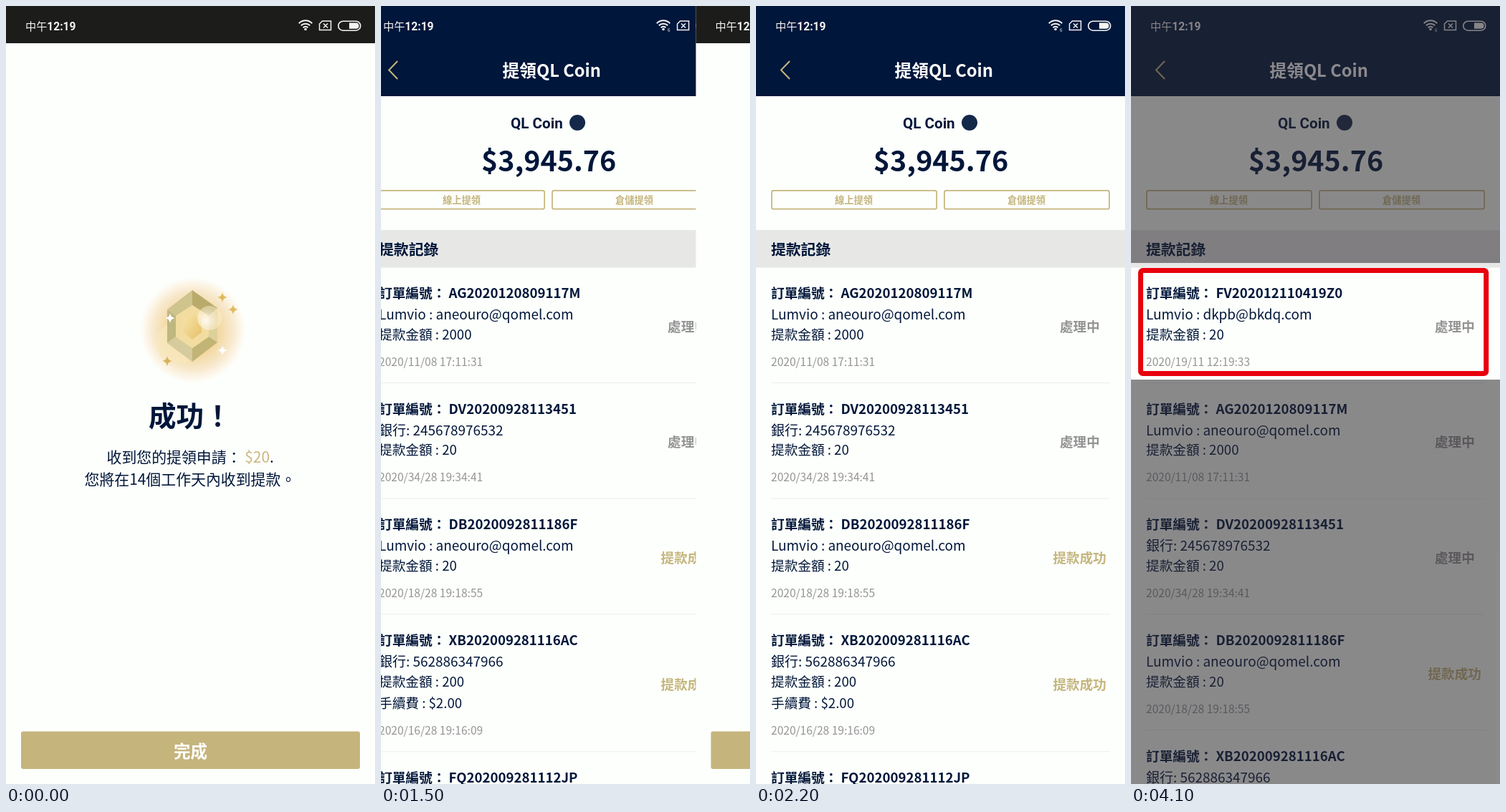
Write an HTML page that moves like this. It is 515 px wide and 1087 px high and loops after 4.8 s.

```html
<!DOCTYPE html>
<html lang="zh-TW">
<head>
<meta charset="utf-8">
<title>提領記錄</title>
<style>
  html, body { margin: 0; width: 100%; height: 100%; overflow: hidden; background: #00112b; }
  svg { display: block; width: 100%; height: 100%; }
  text { font-family: "Noto Sans CJK TC", "Noto Sans CJK SC", "Noto Sans CJK JP", "Noto Sans CJK", sans-serif; white-space: pre; }
  .roboto { font-family: Roboto, sans-serif; }
</style>
</head>
<body>
<svg id="stage" viewBox="0 0 515 1087" preserveAspectRatio="none">
  <defs>
    <radialGradient id="glow">
      <stop offset="0" stop-color="#f0d08c"/>
      <stop offset=".5" stop-color="#f3d9a4"/>
      <stop offset=".75" stop-color="#f8e9cd"/>
      <stop offset=".92" stop-color="#fdf8ee"/>
      <stop offset="1" stop-color="#fdfffc"/>
    </radialGradient>
    <radialGradient id="orb" cx=".35" cy=".6">
      <stop offset="0" stop-color="#fff" stop-opacity=".85"/>
      <stop offset="1" stop-color="#fbeecb" stop-opacity=".5"/>
    </radialGradient>
    <linearGradient id="core" x2="1" y2="1">
      <stop offset="0" stop-color="#f7e6b0"/>
      <stop offset="1" stop-color="#e6c065"/>
    </linearGradient>
  </defs>
</svg>
<script>
const NAVY = '#00163a', GOLD = '#c5b57d', GRAY = '#949494', PAPER = '#fdfffc';
const W = 515, H = 1087, LOOP = 4800;

const text = (x, y, size, str, fill = NAVY, weight = 400, extra = '') =>
  `<text x="${x}" y="${y}" font-size="${size}" font-weight="${weight}" fill="${fill}" ${extra}>${str}</text>`;
const rect = (x, y, w, h, fill, extra = '') =>
  `<rect x="${x}" y="${y}" width="${w}" height="${h}" fill="${fill}" ${extra}/>`;
const poly = (points, fill) => `<polygon points="${points}" fill="${fill}"/>`;
const circle = (x, y, r, fill, extra = '') => `<circle cx="${x}" cy="${y}" r="${r}" fill="${fill}" ${extra}/>`;
const star = (x, y, r, fill) =>
  `<path transform="translate(${x} ${y}) scale(${r})" fill="${fill}" d="M0-1Q.12-.12 1 0Q.12.12 0 1Q-.12.12-1 0Q-.12-.12 0-1"/>`;
const MIDDLE = 'text-anchor="middle"';

function statusBar(color, height, badge) {
  const arc = r => `M${418 - r * .72} ${33.5 - r * .72}A${r} ${r} 0 0 1 ${418 + r * .72} ${33.5 - r * .72}`;
  return rect(0, 0, W, height, color) +
    text(27, 33.5, 15.2, '中午', '#f4f4f4') +
    text(57.3, 33.5, 15.6, '12:19', '#f4f4f4', 700, 'class="roboto"') +
    `<g fill="none" stroke="#f4f4f4" stroke-width="2">
      <path d="${arc(12.8)}${arc(8.6)}${arc(4.6)}"/>
      <path stroke-width="1.5" d="M441.5 21H453.5V33.5H437.5V25ZM443 24.5L449 30.5M449 24.5L443 30.5"/>
      <rect x="463.8" y="21.2" width="31" height="13" rx="6.5" stroke-width="1.6"/>
    </g>` +
    circle(418, 32.5, 1.8, '#f4f4f4') +
    `<path fill="#f4f4f4" d="M479 23.6H488.5A4.1 4.1 0 0 1 488.5 31.8H479Z"/>` +
    (badge ? text(424, 36, 6.5, '6', '#f4f4f4') : '');
}

function gem() {
  return circle(261, 453, 74, 'url(#glow)') +
    circle(240, 471, 30, '#f8e9bd', 'opacity=".75"') +
    poly('260,397 225,424 237,433 260,418', '#cfc48e') +
    poly('260,397 295,422 283,433 260,418', '#b9ab6c') +
    poly('225,424 237,433 237,462 225,471', '#c0b67f') +
    poly('295,422 283,433 283,462 295,470', '#ded09a') +
    poly('225,471 237,462 260,478 260,497', '#d5cb9c') +
    poly('295,470 283,462 260,478 260,497', '#c2b475') +
    poly('260,418 283,433 283,462 260,478 237,462 237,433', '#f2dca0') +
    poly('260,429 273,437 273,456 260,466 247,456 247,437', 'url(#core)') +
    circle(284, 436, 17, 'url(#orb)') +
    star(302, 407, 7, '#e3b95c') + star(317, 424, 7, '#e3b95c') + star(225, 496, 7, '#d8b258') +
    star(229, 436, 7, '#fff') + star(302, 481, 7, '#fff');
}

function successPage() {
  return rect(0, 0, W, H, PAPER) + statusBar('#1c1d1b', 52) + gem() +
    text(199, 587, 38.6, '成功！', NAVY, 700) +
    text(140.5, 638, 20.9, `收到您的提領申請： <tspan fill="#cdb67f">$20</tspan>.`) +
    text(109.5, 669, 20.9, '您將在14個工作天內收到提款。') +
    rect(21, 1013.5, 473, 52.5, GOLD, 'rx="3"') +
    text(257.5, 1049.8, 23.5, '完成', '#fff', 700, MIDDLE);
}

const MAIL = 'Lumvio : aneouro@qomel.com';
const records = [
  { id: 'AG2020120809117M', via: MAIL, sum: 2000, date: '2020/11/08 17:11:31' },
  { id: 'DV20200928113451', via: '銀行: 245678976532', sum: 20, date: '2020/34/28 19:34:41' },
  { id: 'DB2020092811186F', via: MAIL, sum: 20, date: '2020/18/28 19:18:55', done: true },
  { id: 'XB202009281116AC', via: '銀行: 562886347966', sum: 200, date: '2020/16/28 19:16:09', done: true, fee: '$2.00' },
  { id: 'FQ202009281112JP', via: MAIL, sum: 20, date: '2020/12/28 19:12:40', done: true }
];
const newest = { id: 'FV202012110419Z0', via: 'Lumvio : dkpb@bkdq.com', sum: 20, date: '2020/19/11 12:19:33' };

function row(r, y) {
  const drop = r.fee ? 30.2 : 0;
  return text(21, y + 7, 18.65, `訂單編號： ${r.id}`, NAVY, 700) +
    text(21, y + 37, 18.95, r.via) +
    text(21, y + 64.5, 18.65, `提款金額 : ${r.sum}`) +
    (r.fee ? text(21, y + 94.5, 18.65, `手續費 : ${r.fee}`) : '') +
    text(21, y + 101.6 + drop, 15.55, r.date, GRAY) +
    (r.done ? text(414.5, y + 53.7 + drop / 2, 18.6, '提款成功', GOLD, 700)
            : text(424, y + 53.7 + drop / 2, 18.6, '處理中', GRAY, 700)) +
    rect(21, y + 125 + drop, 473, 1, '#eceeeb');
}

function listPage(items) {
  let y = 401, rows = '';
  for (const r of items) {
    rows += row(r, y);
    y += r.fee ? 192 : 161.7;
  }
  const box = (x, label) =>
    rect(x + .9, 257.9, 230.2, 25.8, 'none', `rx="2.5" stroke="${GOLD}" stroke-width="1.7"`) +
    text(x + 115.5, 275.7, 13.3, label, GOLD, 700, MIDDLE);
  return rect(0, 0, W, H, PAPER) + statusBar(NAVY, 126, true) +
    `<path d="M47 77L35 89.5L47 102" fill="none" stroke="${GOLD}" stroke-width="2"/>` +
    text(193.5, 99, 23.7, '提領QL Coin', '#fff', 700) +
    text(205, 170.5, 20.6, 'QL Coin', NAVY, 700, 'class="roboto"') +
    circle(298, 163, 11, '#14284a') +
    text(258, 231, 39.4, '$3,945.76', NAVY, 700, MIDDLE) +
    box(21, '線上提領') + box(262, '倉儲提領') +
    rect(0, 313, W, 52.5, '#e7e8e6') +
    text(21, 347.8, 20.8, '提款記錄', NAVY, 700) + rows;
}

const stage = document.getElementById('stage');
stage.insertAdjacentHTML('beforeend',
  `<g id="list">${listPage(records)}</g>
   <g id="success">${successPage()}</g>
   <g id="spot">${listPage([newest, ...records])}
     <g id="shade">${rect(0, 0, W, 359, 'inherit') + rect(0, 522, W, H - 522, 'inherit')}</g>
     ${rect(13.5, 369.5, 482.2, 144, 'none', 'rx="3" stroke="#e8000d" stroke-width="7"')}
   </g>`);

const [list, success, spot, shade] = ['list', 'success', 'spot', 'shade'].map(id => document.getElementById(id));
const show = (el, on) => el.setAttribute('display', on ? 'inline' : 'none');
const shift = (el, x) => el.setAttribute('transform', `translate(${x} 0)`);

function draw(now) {
  const t = Math.floor(now % LOOP / 100) * 100;   // ten steps a second
  const u = Math.min(1, Math.max(0, (t - 1400) / 300));
  const p = 1 - (1 - u) ** 4.6;
  shift(list, -154.5 * (1 - p));
  shift(success, 520 * p);
  show(success, t < 1700);
  show(spot, t >= 2300);
  shade.setAttribute('fill', t < 3000 ? 'rgba(31,28,24,.55)' : 'rgba(44,41,46,.55)');
}

const start = performance.now();
(function tick() {
  draw(performance.now() - start);
  requestAnimationFrame(tick);
})();
</script>
</body>
</html>
```
